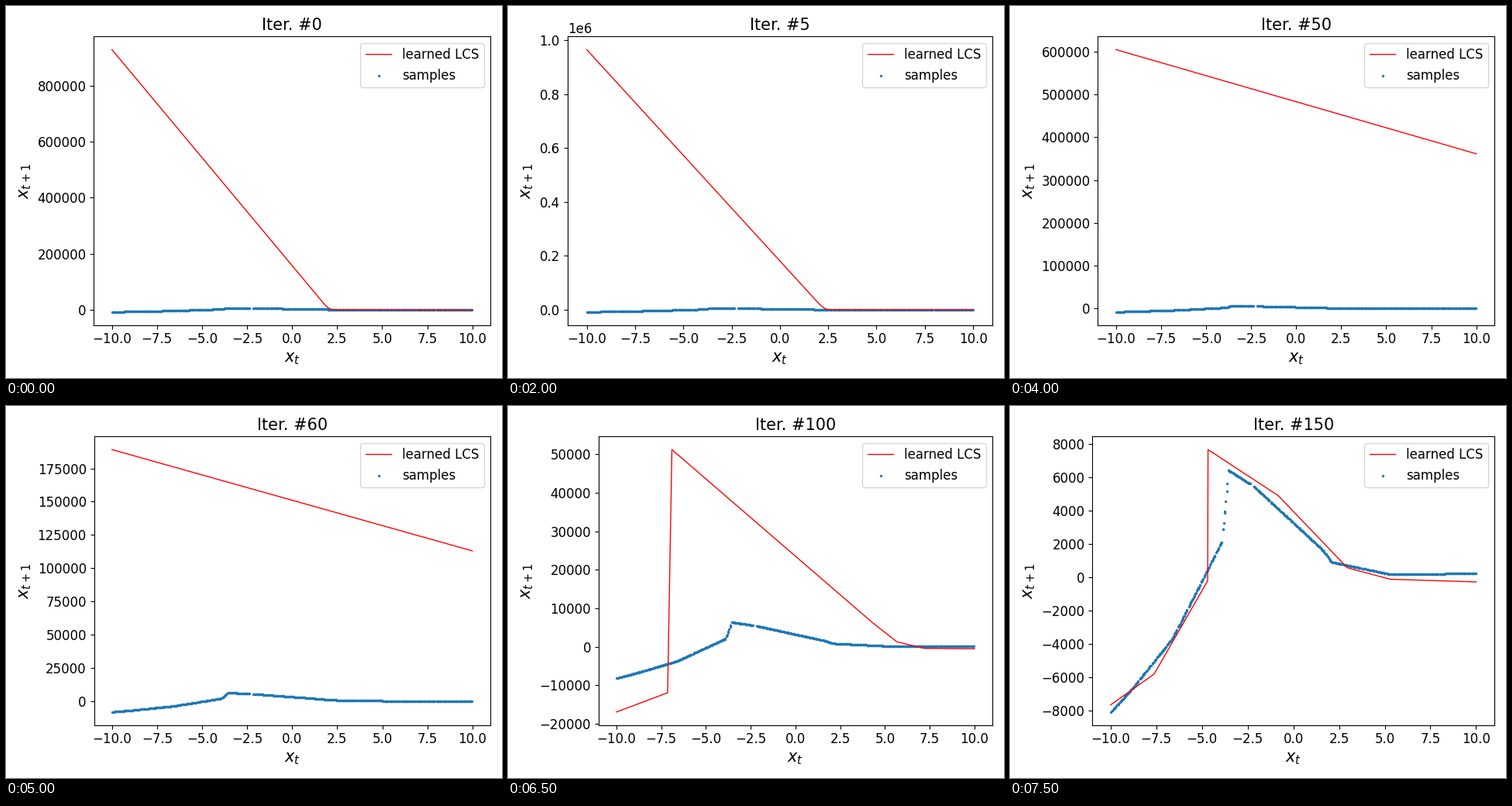
These frames come from a looping animation (640 by 480 pixels, 8000 ms). A matplotlib script:

```python
import numpy as np
import matplotlib.pyplot as plt
from matplotlib.animation import FuncAnimation

plt.rcParams.update({
    "font.family": "DejaVu Sans",
    "font.size": 10,
    "axes.titlesize": 15,
    "axes.labelsize": 15,
    "xtick.labelsize": 12,
    "ytick.labelsize": 12,
    "legend.fontsize": 12,
})

ITERS = [0, 1, 2, 3, 5, 10, 20, 30, 50, 55, 60, 70, 80, 100, 120, 150]
GRID = np.linspace(-10, 10, 801)

# Corners of the late fits, y in thousands: three up to the jump, then the decline
FITS = {
    70: [(-10, -24.8), (-8.5, -20.9), (-7.06, -17.2), (-6.41, 92.1),
         (-1, 77.9), (3, 67.4), (6.75, 57.6), (10, 48.1)],
    100: [(-10, -16.9), (-8.5, -14.3), (-7.14, -11.9), (-6.9, 51.2),
          (4.3, 6.3), (5.67, 1.3), (7.2, -0.4), (10, -0.5)],
    150: [(-10, -7.68), (-7.62, -5.83), (-4.69, -0.23), (-4.67, 7.64),
          (-0.83, 4.88), (2.95, 0.55), (5.3, -0.14), (10, -0.3)],
}

# Corners of the sampled system, y in thousands
SYSTEM = [(-10, -8.13), (-8.81, -6.7), (-6.6, -3.66), (-4.82, 0.15),
          (-3.88, 2.2), (-3.76, 3.7), (-3.56, 6.4), (-2.2, 5.47),
          (1.64, 1.58), (2.08, 0.89), (5.33, 0.15), (8.1, 0.15),
          (8.34, 0.19), (10, 0.19)]


def hinge(it):
    """Steep ramp with a softened knee, growing with the iteration."""
    top = 928e3 + 3533 * it + 673 * it**2
    knee = 2.04 + 0.0458 * it + 0.00123 * it**2
    soft = 0.1 * np.logaddexp(0, (knee - GRID) / 0.1)
    return GRID, top / (knee + 10) * soft + 150 * (it - GRID)


def ramp(it):
    """Straight line that shrinks towards the samples."""
    return GRID, 483250 * np.exp((50 - it) / 8.6) * (1 - 0.0252 * GRID)


def jump(it):
    """Blend of the two neighbouring late fits, easing out."""
    lo, hi = (70, 100) if it <= 100 else (100, 150)
    w = 1 - (1 - (it - lo) / (hi - lo)) ** 5
    x, y = ((1 - w) * np.array(FITS[lo]) + w * np.array(FITS[hi])).T
    return x, 1000 * y


def learned(it):
    shape = hinge if it < 50 else ramp if it < 70 else jump
    return shape(it)


rng = np.random.default_rng(4)
xs = np.linspace(-9.98, 9.98, 620)
xs[1:-1] += rng.uniform(-0.05, 0.05, xs.size - 2)
xs = xs[np.abs(xs + 2.26) > 0.1]
sx, sy = np.array(SYSTEM).T
ys = 1000 * np.interp(xs, sx, sy)

fig, ax = plt.subplots(figsize=(6.4, 4.8), dpi=100)


def update(i):
    ax.clear()
    fig.subplots_adjust(left=0.125, right=0.9, bottom=0.11, top=0.88)
    ax.plot(*learned(ITERS[i]), color="red", lw=1, label="learned LCS")
    ax.scatter(xs, ys, s=2, color="tab:blue", label="samples")
    ax.set_title(f"Iter. #{ITERS[i]}")
    ax.set_xlabel("$x_t$")
    ax.set_ylabel("$x_{t+1}$")
    ax.legend(loc="upper right")
    fig.tight_layout()


anim = FuncAnimation(fig, update, frames=len(ITERS), interval=500,
                     repeat=True, repeat_delay=0)
plt.show()
```
